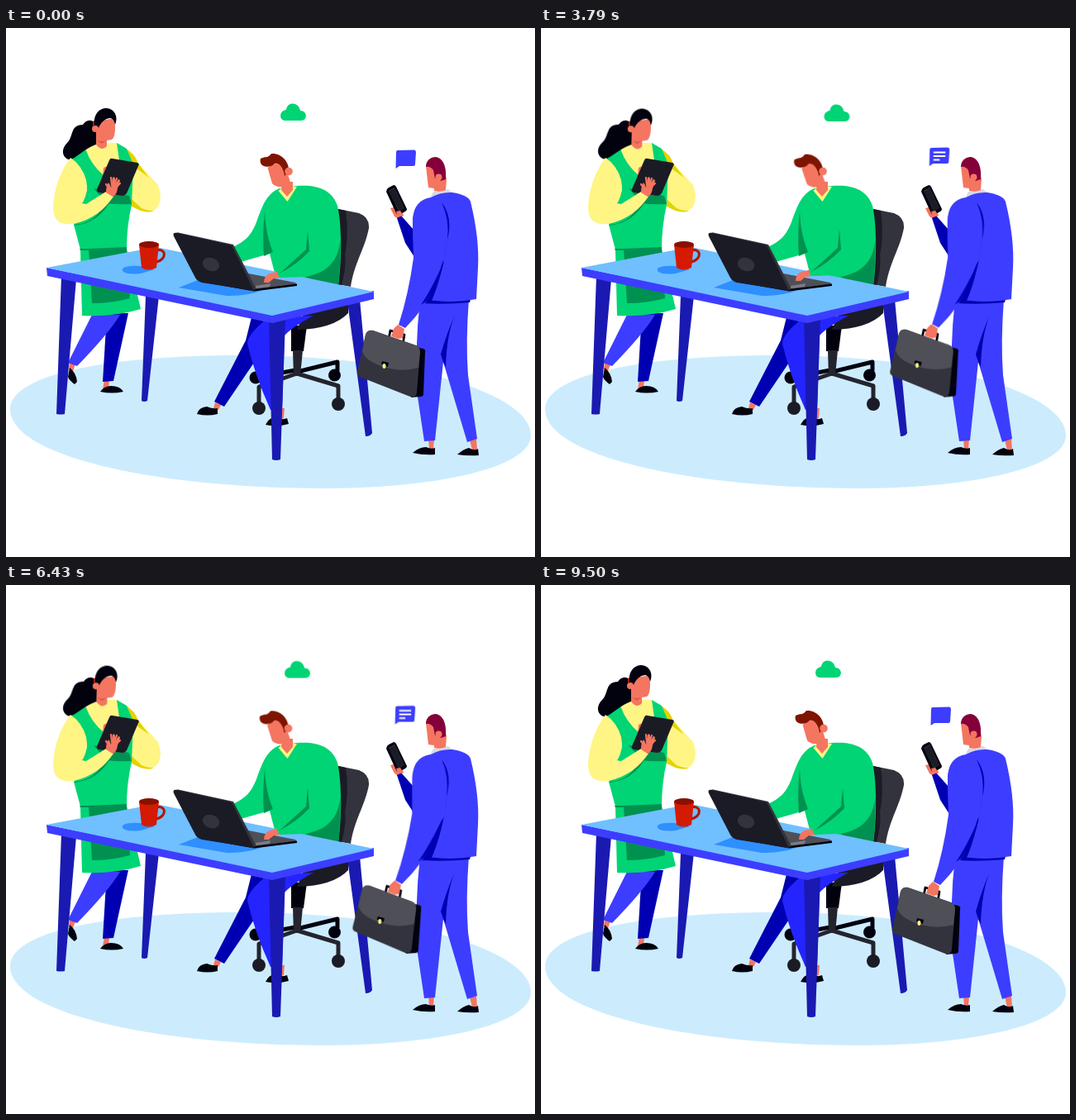
An HTML page that plays this animation: 640 px wide and 640 px high, repeating every 9.57 s.

```html
<!DOCTYPE html>
<html lang="en">
<head>
<meta charset="utf-8">
<title>Office scene</title>
<style>
  html, body { margin: 0; width: 100%; height: 100%; overflow: hidden; background: #fff; }
  svg { display: block; width: 100vw; height: 100vh; }

  .green { fill: #00d474; } .moss { fill: #009150; }
  .lemon { fill: #fff585; } .mustard { fill: #e3d400; }
  .skin { fill: #f47560; }
  .blue { fill: #3d3dff; } .navy { fill: #0000b2; } .leg { fill: #1a1ab2; }
  .ink { fill: #02020f; } .coal { fill: #1b1b26; } .slate { fill: #33333d; } .ash { fill: #4f4f58; }
  .line { fill: none; stroke-linecap: round; stroke-linejoin: round; }

  .loop { animation: 9570ms cubic-bezier(.4, 0, .6, 1) infinite; }
  .cloud { animation-name: cloud; }
  .bubble { animation-name: bubble; }
  .nod { animation-name: nod; transform-origin: 340px 195px; }
  .turn { animation-name: turn; transform-origin: 118px 142px; }
  .type { animation-name: type; }
  .tap { animation-name: tap; transform-origin: 112px 210px; }
  .words { animation-name: words; transform-origin: 475px 0; }
  .doc { animation-name: doc; animation-timing-function: linear; }
  .mail { animation-name: mail; animation-timing-function: linear; }
  .swing {
    transform-origin: 525px 215px;
    animation: swing 2392.5ms cubic-bezier(.37, 0, .63, 1) infinite alternate;
  }

  @keyframes cloud {
    0%, 83.6%, 100% { transform: none; }
    37.6%, 50% { transform: translate(10.5px, 1px); }
  }
  @keyframes bubble {
    0%, 83.6%, 100% { transform: none; }
    37.6%, 50% { transform: translate(-1.7px, -3px); }
  }
  @keyframes nod {
    0%, 83.6%, 100% { transform: none; }
    37.6%, 50% { transform: rotate(-2.5deg); }
  }
  @keyframes turn {
    0%, 25.4%, 99%, 100% { transform: none; }
    31.3%, 86% { transform: translate(.3px, .5px) rotate(1.6deg); }
  }
  @keyframes type {
    0%, 31%, 48%, 100% { transform: none; }
    38%, 41% { transform: translate(-4px, -2px); }
  }
  @keyframes tap {
    0%, 40%, 62%, 100% { transform: none; }
    46%, 55% { transform: rotate(1.2deg); }
  }
  @keyframes words {
    0%, 12%, 80%, 100% { transform: scaleX(0); }
    20%, 73% { transform: none; }
  }
  @keyframes doc {
    0%, 43.9% { transform: translate(136px, 180px) scale(0); }
    47% { transform: translate(191px, 162px) rotate(12deg); }
    55.28% { transform: translate(339px, 113px) rotate(45deg); }
    57.5%, 100% { transform: translate(358px, 104px) rotate(50deg) scale(0); }
  }
  @keyframes mail {
    0%, 75% { transform: translate(348px, 102px) scale(0); }
    78% { transform: translate(372px, 96px); }
    85.8% { transform: translate(454.5px, 174px) rotate(-8deg); }
    87.5%, 100% { transform: translate(472px, 205px) rotate(-8deg) scale(0); }
  }
  @keyframes swing { to { transform: rotate(2deg); } }
</style>
</head>
<body>
<svg viewBox="0 0 640 640">
  <path fill="#ccecfe" d="M5 461C5 420 120 396 285 396C480 396 635 440 635 493C635 532 520 557 385 557C190 557 5 520 5 461Z"/>

  <!-- chair -->
  <g>
    <path class="line" stroke="#02020f" stroke-width="5" d="M352 416L401 404V414M350 414L302 423"/>
    <path class="line" stroke="#24242e" stroke-width="5" d="M352 418L306 434V455M352 418L402 433V450"/>
    <g class="coal">
      <circle cx="302" cy="423" r="7.5" class="ink"/><circle cx="397.500" cy="420" r="7.500" class="ink"/>
      <circle cx="306" cy="460" r="8"/><circle cx="402" cy="455" r="8"/>
    </g>
    <path class="ink" d="M345 360H364L360 391H345Z"/>
    <path fill="#24242e" d="M347 390H359L356 421H348Z"/>
    <path class="coal" d="M352 365Q396 364 414 345V332L360 346Z"/>
    <path class="slate" d="M402 219L427 224Q440 229 439 242C434 268 422 282 417 313L400 310Z"/>
    <path class="coal" d="M402 219L411 221Q415 250 410 275Q412 288 406 311H398Z"/>
  </g>

  <!-- seated man -->
  <g>
    <path class="skin" d="M253 453L260 456L257 462L251 460ZM331 460H337L336 472L332 473Z"/>
    <path class="ink" d="M231 467Q233 459 243 458Q250 461 256 460L256 467Q244 470 231 467ZM314 480Q318 472 326 470Q334 475 340 472L342 479Q328 483 314 480Z"/>
    <path class="navy" d="M297 350L330 360L306 396L264 458L252 452L290 378Z"/>
    <path fill="#2424ff" d="M318 350Q292 370 292 382Q301 420 320 462H334L337 372Q346 362 372 348Z"/>
    <path class="green" d="M331 194C316 200 311 213 304 232C297 252 288 259 274 265L284 283L319 273L326 300L401 318C406 290 407 240 401 215C395 196 377 189 352 191Z"/>
    <path class="moss" d="M313 222Q314 250 323 271L312 276Q310 250 313 222ZM404.500 256C402 285 385 297 362 301L401 318Q405 290 404.500 256Z"/>
    <path class="lemon" d="M329.500 197L335 192H352L340.500 210Z"/>
    <path class="skin" d="M334 186L347 186V196L340 204L333 196Z"/>
    <g class="nod">
      <path class="skin" d="M316.500 169Q326 160 338 167L345 190L335 192Q326 193 322 188Z"/>
      <path fill="#7f1400" d="M308 158C313 155 317 158 321 152C334 151 343 163 342 173L337 179C336 170 331 162 325 164C318 171 305 168 308 158Z"/>
      <circle class="skin" cx="342" cy="173.500" r="4.800"/>
    </g>
  </g>

  <!-- woman -->
  <g>
    <path class="skin" d="M77 403L84 407L81 415L76 413ZM119 426H125L124 437H117Z"/>
    <path class="ink" d="M77 411Q85 417 86 428L83 431Q76 426 75 422ZM114 440Q119 433 127 433Q138 433 142 440Q128 443 114 440Z"/>
    <path class="navy" d="M122 345H148L130 427L117 428Z"/>
    <path class="blue" d="M104 347H138Q124 370 86 409L75 405Z"/>
    <path class="lemon" d="M144 146L155 158L184 190Q190 205 184 216Q176 226 164 221L147 212Z"/>
    <path class="mustard" d="M145 146Q156 152 160 164L173 181L158 170L148 158ZM152 207L164 218Q174 222 180 221Q168 226 151 215Z"/>
    <path class="green" d="M97 145L84 150L77 157Q96 172 98 196L82 238L90 268L92 348Q130 350 163 340L146 268Q146 240 152 214L154 165L146 146L134 139Z"/>
    <path class="lemon" d="M96 146L112 139L134 139L137 160L118 178Q103 166 96 146Z"/>
    <path class="moss" d="M106 194L149 203L152 213Q135 214 122 212ZM83 238Q108 236 120 212L128 207Q112 236 83 239ZM100 267L146 265L150 327Q128 333 104 333ZM89 267H146V269H90Z"/>
    <g class="turn">
      <path class="ink" d="M108 115C102 109 96 112 93 117C77 117 82 132 74 139C67 146 67 155 75 159C84 160 90 148 111 140Z"/>
      <path fill="#d41a00" d="M105 113L109 111V119L105 118Z"/>
      <path class="skin" d="M111 113L131 109Q134 130 128 135L122 136V143Q116 150 109 141V124Z"/>
      <path class="ink" d="M107 120C105 105 112 97 122 97C132 98 136 108 132 117C131 111 128 109 126 109C118 110 114 116 112 121Z"/>
      <circle class="skin" cx="108" cy="122" r="4"/>
      <path fill="#d45c49" d="M110 136Q116 138 121 136L116 140Z"/>
    </g>
    <path class="skin" d="M118 169L125 166L122 182L117 179Z"/>
    <path class="coal" d="M110 195L125 160Q126 157 129 158L159 163Q162 164 160 167L146 200Q144 203 141 203L113 199Q109 198 110 195Z"/>
    <g class="tap">
      <path class="lemon" d="M78 157C64 175 57 200 57 218C58 236 68 238 82 237C104 232 119 220 130 204L121 198L97 213Q89 212 93 211Q100 198 97 184Q92 166 78 157Z"/>
      <path class="skin" d="M121 199Q121 191 124 187L126 190L127 193L129 181Q131 179 132 182V189L136 183Q138 183 138 185L135 194Q134 202 129 204Z"/>
      <path class="line" stroke="#f47560" stroke-width="2.200" d="M124 193L121 189M128 190L127 181M131 191L134 182M132 194L138 188"/>
    </g>
  </g>

  <!-- table -->
  <g>
    <path class="leg" d="M169 324H185L171 451Q167 453 164 451ZM413 331L428 328L443 490Q441 494 435 494Z"/>
    <path class="leg" d="M67 300L85 304L71 467Q66 468 61 467ZM318 353H338L332 522Q327 524 322 522Z"/>
    <path class="blue" d="M49 290L322 346L445 318V328L322 357L50 300Z"/>
    <path fill="#70bfff" d="M49 290L181 265L445 319L322 348Z"/>
    <path fill="#2f8fff" d="M141 291Q146 287 162 288L180 292L163 297Q146 299 141 294ZM209 314L232 305L314 316Q290 325 267 324Z"/>
    <path class="line" stroke="#b31400" stroke-width="3" d="M182 269C194 266 195 280 182 283"/>
    <path fill="#d41a00" d="M161 262H185L182 290Q172 295 164 290Z"/>
    <ellipse fill="#8a1000" cx="173" cy="262" rx="12" ry="4"/>
  </g>

  <!-- laptop -->
  <g>
    <path class="ash" d="M288 296L350 308L352 311L299 318Z"/>
    <path fill="#7c7c84" d="M302 312L320 309L319 313L302 315Z"/>
    <path class="ink" d="M236 307L300 316L352 309.500V312L300 318.500Z"/>
    <path class="slate" d="M206 247L275 262L303 316L297 318Z"/>
    <path class="coal" d="M203 252Q201 247 207 248L273 263L300 318L237 308Q231 306 229 302Z"/>
    <ellipse class="slate" cx="248" cy="286" rx="10.500" ry="8" transform="rotate(18 248 286)"/>
  </g>

  <g class="loop type">
    <path class="skin" d="M312 308Q312 300 319 297L331 294L332 302L324 303L318 308Z"/>
    <path class="green" d="M364 264L328 295Q329 301 332 302L362 301L385 290Z"/>
    <path class="moss" d="M365 245L367 270Q352 286 331 297L363 268Z"/>
  </g>

  <!-- standing man -->
  <g>
    <path class="skin" d="M465 218L473 216L481 226L476 232L470 228ZM511 497H518L517 510H512ZM561 498L569 496L570 511H564Z"/>
    <path class="navy" d="M473 230L478 227L494 245V277L483 260Z"/>
    <path class="ink" d="M460 198Q460 195 463 193L469 190Q471 190 472 192L485 219Q485 221 483 222L476 226Q473 227 472 224Z"/>
    <path class="slate" d="M463 197L470 193L482 218L475 222Z"/>
    <path class="coal" d="M463.500 198L470 194.500L481.500 218L475.500 221Z"/>
    <path class="skin" d="M474 229L472 222L477 221L481 227Z"/>
    <path class="ink" d="M492 514Q500 507 508 507Q515 510 519 508L519 516Q505 517 492 514ZM546 516Q554 509 560 508Q567 512 571 509L572 517Q558 518 546 516Z"/>
    <path class="blue" d="M501 328L560 328Q556 380 559 420L570 497L558 501L529 404L519 499L506 500L498 446Q494 390 501 328Z"/>
    <path class="navy" d="M543 347Q533 372 532 410L529 404L526 395Q533 370 543 347ZM505 330L562 328L561 332Q530 335 503 333Z"/>
    <path fill="#d9d9e0" d="M513 206L517 198L535 195L541 200Z"/>
    <path class="blue" d="M514 205Q526 198 540 199Q559 202 562 210Q573 255 571 290L569 328Q535 334 508 328L493 270L492 232Q494 208 514 205Z"/>
    <path class="navy" d="M530 280L534 255Q528 300 515 330L502 334Z"/>
    <path class="skin" d="M508 167L528 164L533 183L532 196Q526 199 518 197V194L511 193Z"/>
    <path fill="#85003a" d="M508 168C508 160 514 156 520 156C531 158 533 172 532 183L526 185Q522 180 519 182L517 172Q513 167 508 168Z"/>
    <circle class="skin" cx="523.500" cy="180.500" r="4"/>
  </g>

  <g class="swing">
    <path class="line" stroke="#02020f" stroke-width="2.800" d="M463 376L465 366L482 371L480 383"/>
    <path class="ink" d="M496 386L505 388Q508 389 507 393L505 443Q505 446 501 446L490 447Z"/>
    <path class="slate" d="M435 371Q437 365 444 366L496 384Q501 386 501 392L497 441Q496 448 489 446L428 422Q424 420 425 416Z"/>
    <path class="ash" d="M435 371Q437 365 444 366L496 384Q501 386 501 392L499 411Q474 418 449 407Q434 401 431 391Z"/>
    <path class="ink" d="M455 403L463 405L462 410L454 407Z"/>
    <ellipse class="lemon" cx="457.500" cy="409" rx="2" ry="3"/>
    <path class="skin" d="M474 359L482 364L480 375L475 376L466 373L469 364Z"/>
    <path class="blue" d="M514 206C498 208 492 218 492 238L493 278Q487 322 475 359L483 363Q508 338 521 307Q533 270 535 240Q534 205 514 206Z"/>
    <path class="navy" d="M527 211Q541 229 534 256Q537 232 527 211ZM530 282Q524 310 508 331L502 335Q515 316 530 282Z"/>
  </g>

  <!-- floating icons -->
  <g class="loop doc">
    <path class="green" d="M-5-10H9V10H-9V-6Z"/>
    <path fill="#fff" d="M-9-10H-5V-6H-9Z"/>
    <path class="line" stroke="#fff" stroke-width="1.600" d="M-5-3H5M-5 1H5M-5 5H5"/>
  </g>
  <g class="loop mail">
    <path class="green" d="M-8-5.500H8V5.500H-8Z"/>
    <path class="line" stroke="#fff" stroke-width="1.700" d="M-7-5L0 1L7-5"/>
  </g>
  <path class="loop cloud green" d="M338 112C330 112 330 100 339 99C340 89 354 89 356 100C365 100 365 112 357 112Z"/>
  <g class="loop bubble">
    <path class="blue" d="M474 148L494 147.500Q496 148 496 150L495 165Q495 167 493 167H476L471.500 170L472 150Q472 148 474 148Z"/>
    <path class="loop words line" stroke="#fff" stroke-width="2.200" style="stroke-linecap:butt" d="M476.500 153.500H491M476.500 158H491M476.500 162.500H484"/>
  </g>
</svg>
<script>
  // The head turn shares the scene's loop timing.
  document.querySelectorAll('.turn, .tap, .nod').forEach(el => el.classList.add('loop'));
</script>
</body>
</html>
```
